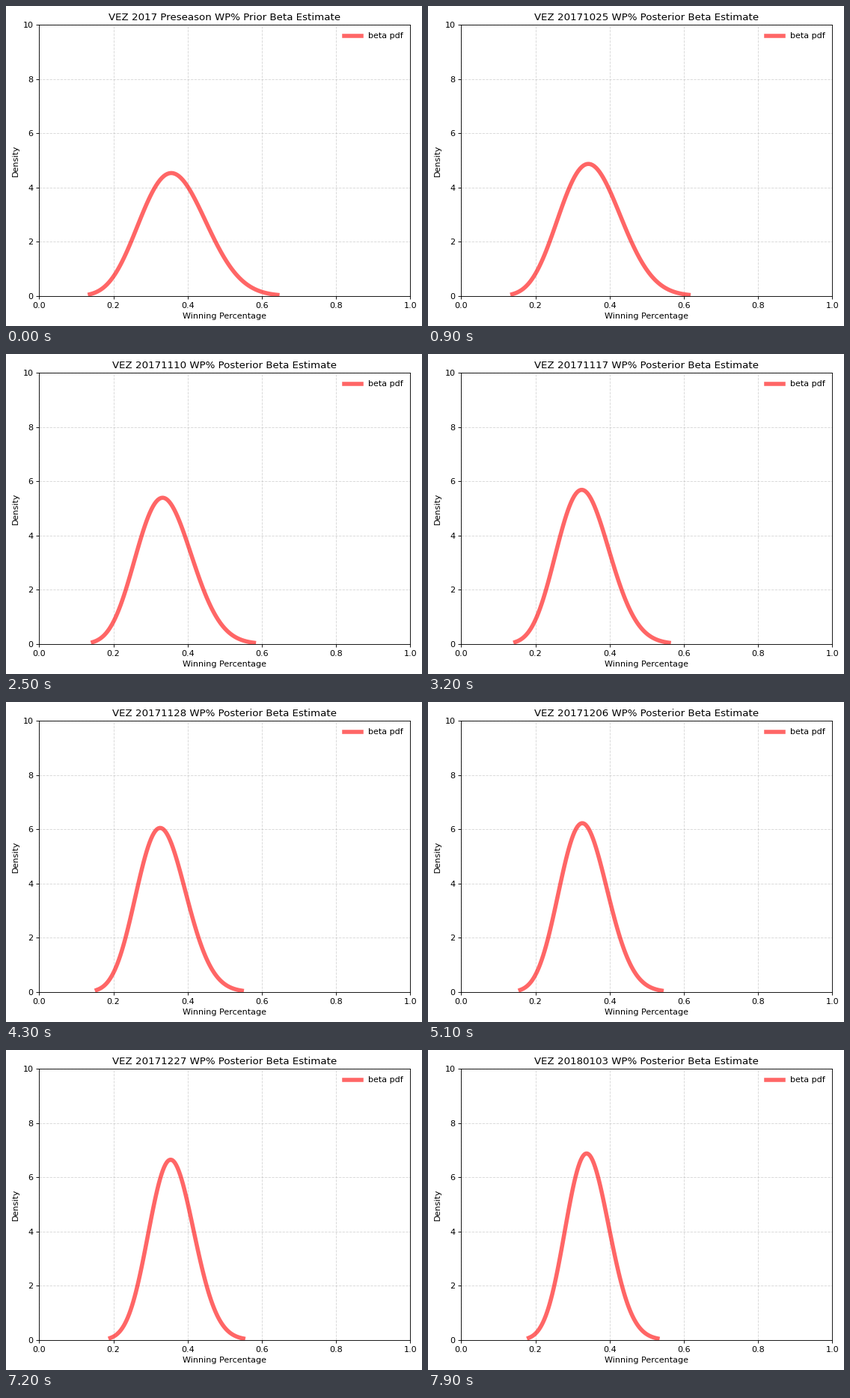
Animation, 556 px wide and 428 px high, one loop 8000 ms. Source, as a matplotlib script:

```python
from math import lgamma

import numpy as np
import matplotlib.pyplot as plt
from matplotlib.animation import FuncAnimation

W, H, DPI = 556, 428, 80
FRAMES, INTERVAL = 80, 100
TEAM = "VEZ"
START = np.datetime64("2017-10-16")

# Prior shape parameters and the days (after START) of each win and loss
PRIOR_A, PRIOR_B = 11.04, 19.16
WINS = np.array([4, 22, 24, 32, 37, 42, 46, 53, 57, 64, 65, 72])
LOSSES = np.array([2, 5, 7, 10, 13, 15, 16, 19, 26, 28, 30, 33, 35, 40,
                   43, 47, 51, 55, 59, 62, 68, 71, 74, 76, 78])

GRID = np.linspace(0, 1, 20001)[1:-1]


def beta_pdf(x, a, b):
    log_norm = lgamma(a + b) - lgamma(a) - lgamma(b)
    return np.exp(log_norm + (a - 1) * np.log(x) + (b - 1) * np.log1p(-x))


def beta_curve(a, b, tail=0.001, points=100):
    """Density between the lower and upper tail quantiles."""
    cdf = np.cumsum(beta_pdf(GRID, a, b))
    lo, hi = np.interp([tail, 1 - tail], cdf / cdf[-1], GRID)
    x = np.linspace(lo, hi, points)
    return x, beta_pdf(x, a, b)


def title_for(day):
    if day == 0:
        return f"{TEAM} 2017 Preseason WP% Prior Beta Estimate"
    date = str(START + day).replace("-", "")
    return f"{TEAM} {date} WP% Posterior Beta Estimate"


plt.rcParams["font.family"] = "DejaVu Sans"
fig = plt.figure(figsize=(W / DPI, H / DPI), dpi=DPI, facecolor="white")
ax = fig.add_axes([44.3 / W, 40.2 / H, 496 / W, 362.4 / H])
ax.set(xlim=(0, 1), ylim=(0, 10),
       xlabel="Winning Percentage", ylabel="Density")
ax.grid(linestyle="--", alpha=0.5)
line, = ax.plot([], [], "r-", lw=5, alpha=0.6, label="beta pdf")
title = ax.set_title("")
ax.legend(loc="upper right", frameon=False)


def update(day):
    a = PRIOR_A + np.sum(WINS <= day)
    b = PRIOR_B + np.sum(LOSSES <= day)
    line.set_data(*beta_curve(a, b))
    title.set_text(title_for(day))
    return line, title


anim = FuncAnimation(fig, update, frames=FRAMES, interval=INTERVAL,
                     init_func=lambda: update(0), repeat=True, repeat_delay=0)
plt.show()
```
